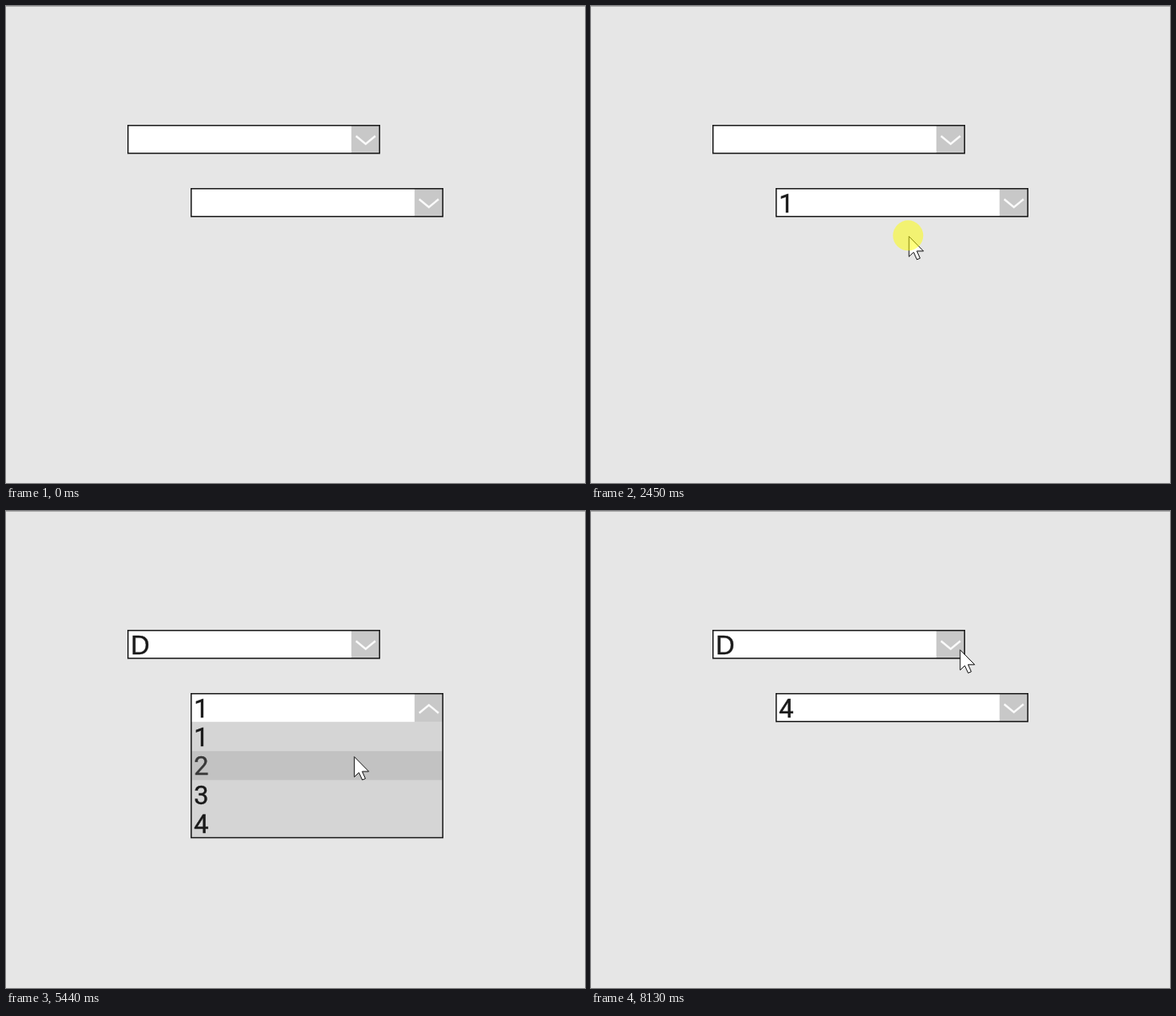
An HTML page for the animation above (8.2 s loop, 687 px wide and 566 px high).

```html
<!DOCTYPE html>
<html lang="en">
<head>
<meta charset="utf-8">
<title>Dropdowns</title>
<style>
  html, body { margin: 0; width: 100%; height: 100%; overflow: hidden; background: #e6e6e6; }
  svg { display: block; width: 687px; height: 566px; }
  text { font-size: 31px; fill: #1a1a1a; stroke: #1a1a1a; stroke-width: .4px; }
  .letters { font-family: "Liberation Sans", Arial, sans-serif; }
  .digits { font-family: Roboto, sans-serif; }
  .hover { fill: #383838; stroke: #383838; }
</style>
</head>
<body>
<svg id="stage" viewBox="0 0 687 566">
  <rect width="687" height="566" fill="#e6e6e6"/>
  <rect width="687" height="1" fill="#adadad"/>
  <g id="boxes"></g>
  <path id="cursor" d="M.5 .5V24.5L6 19.3L10 28L13.7 26.4L9.9 18H17.7Z" fill="#fff" stroke="#111"/>
  <circle id="press" r="18" fill="#ff0" fill-opacity=".5"/>
</svg>
<script>
const LOOP = 8200, ENTER = 400, FLASH = 140;
const WIDTH = 298.5, HEADER = 33.75, ROW = 34.4;

const boxes = [
  { x: 144.75, y: 141.75, items: [..."ABCD"], font: "letters" },
  { x: 219.75, y: 216.75, items: [..."1234"], font: "digits" }
];

// Places the pointer goes to, relative to a dropdown's button or list
const button = (box, dx, dy) => ({ box, x: boxes[box].x + 281.75 + dx, y: boxes[box].y + 16.5 + dy });
const row = (box, dx, n) => ({
  box, x: boxes[box].x + dx, y: boxes[box].y + HEADER + n * ROW, item: boxes[box].items[Math.floor(n)]
});

// Each move ends at a time; one with a wait is followed by a press
const entry = { x: 663, y: 212 };
const moves = [
  { at: 880, travel: 480, wait: 0, ...button(1, 2, -3) },
  { at: 1360, travel: 340, ...button(0, 21, 0) },
  { at: 1900, travel: 540, ...row(1, 158, 1.17) },
  { at: 2230, travel: 100, wait: 220, ...row(1, 157, 0.65) },
  { at: 3060, travel: 470, ...button(1, -17, -14) },
  { at: 3760, travel: 700, wait: 70, ...button(0, 0, 8) },
  { at: 4340, travel: 370, wait: 270, ...row(0, 158, 3.12) },
  { at: 5060, travel: 380, wait: 30, ...button(1, -2, 1) },
  { at: 5440, travel: 260, ...row(1, 193, 1.18) },
  { at: 5700, travel: 260, wait: 20, ...row(1, 184, 2.2) },
  { at: 6750, travel: 950, wait: 70, ...button(1, -6, -10) },
  { at: 7370, travel: 440, wait: 270, ...row(1, 165, 3.44) },
  { at: 8130, travel: 420, ...button(0, 11, 6) }
];
const presses = moves.filter(m => "wait" in m).map(m => ({ time: m.at + m.wait, box: m.box, item: m.item }));

const layer = document.getElementById("boxes");
const cursor = document.getElementById("cursor");
const press = document.getElementById("press");

function set(node, attrs) {
  for (const key in attrs) node.setAttribute(key, attrs[key]);
}

function add(parent, tag, attrs, text = "") {
  const node = document.createElementNS("http://www.w3.org/2000/svg", tag);
  set(node, attrs);
  node.textContent = text;
  return parent.appendChild(node);
}

function show(node, visible) {
  node.style.display = visible ? "" : "none";
}

function build(box) {
  const { x, y, items, font } = box;
  const group = add(layer, "g", { transform: `translate(${x} ${y})`, class: font });
  add(group, "rect", { width: WIDTH, height: HEADER - 0.5, fill: "#fff" });
  add(group, "rect", { x: 265, width: 33.5, height: HEADER, fill: "#c8c8c8" });
  box.chevron = add(group, "path", { fill: "none", stroke: "#fafafa", "stroke-width": 2.3 });
  box.label = add(group, "text", { x: 3.2, y: 28 });
  box.list = add(group, "g", {});
  add(box.list, "rect", { y: HEADER, width: WIDTH, height: items.length * ROW, fill: "#d5d5d5" });
  box.rows = items.map((item, i) => {
    const top = HEADER + i * ROW;
    return {
      back: add(box.list, "rect", { y: top, width: WIDTH, height: ROW, fill: "#c2c2c2" }),
      text: add(box.list, "text", { x: 3.2, y: top + 28.5 }, item)
    };
  });
  box.frame = add(group, "rect", { width: WIDTH, fill: "none", stroke: "#1c1c1c", "stroke-width": 1.5 });
  box.group = group;
}

function draw(box, open, value, pointer) {
  const inside = open && pointer.x > box.x && pointer.x < box.x + WIDTH;
  const hovered = inside ? Math.floor((pointer.y - box.y - HEADER) / ROW) : -1;
  box.label.textContent = value;
  show(box.list, open);
  set(box.chevron, { d: open ? "M270.5 23L282 13.5L293.5 23" : "M270.5 12.5L282 22L293.5 12.5" });
  set(box.frame, { height: open ? HEADER + box.items.length * ROW - 0.5 : HEADER - 0.75 });
  box.rows.forEach((line, i) => {
    show(line.back, i === hovered);
    line.text.classList.toggle("hover", i === hovered);
  });
}

function pointerAt(t) {
  let { x, y } = entry;
  for (const move of moves) {
    const k = Math.min(1, Math.max(0, (t - move.at + move.travel) / move.travel));
    const eased = k * k * (3 - 2 * k);
    x += (move.x - x) * eased;
    y += (move.y - y) * eased;
  }
  return { x, y };
}

function render(t) {
  const pointer = pointerAt(t);
  const states = boxes.map(() => ({ open: false, value: "" }));
  for (const { time, box, item } of presses) {
    if (t < time) break;
    states[box].open = !states[box].open;
    if (item) states[box].value = item;
  }
  boxes.forEach((box, i) => draw(box, states[i].open, states[i].value, pointer));

  // The open list covers the other dropdown
  const front = boxes[states[0].open ? 0 : 1].group;
  if (layer.lastChild !== front) layer.appendChild(front);

  set(cursor, { transform: `translate(${pointer.x} ${pointer.y})` });
  set(press, { cx: pointer.x - 0.5, cy: pointer.y - 0.5 });
  show(cursor, t >= ENTER);
  show(press, presses.some(p => t >= p.time && t < p.time + FLASH));
}

boxes.forEach(build);
const start = performance.now();
function tick() {
  render((performance.now() - start) % LOOP);
  requestAnimationFrame(tick);
}
tick();
</script>
</body>
</html>
```
